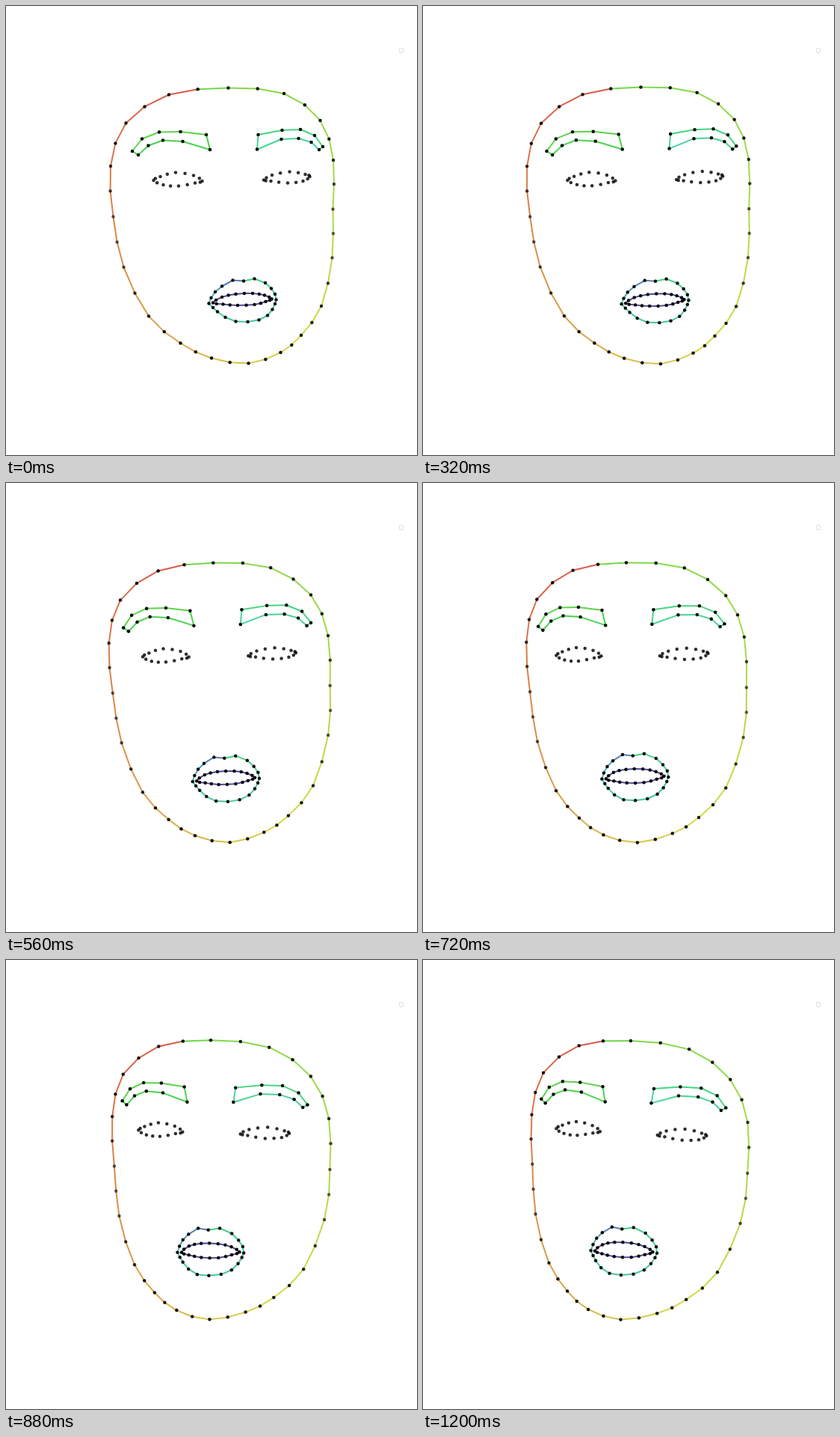
Write an HTML page with a canvas that moves like this. It is 550 px wide and 600 px high and loops after 1.28 s.

```html
<!DOCTYPE html>
<html lang="en">
<head>
<meta charset="utf-8">
<title>Face contours</title>
<style>
html, body { margin: 0; width: 100%; height: 100%; overflow: hidden; background: #fff; }
canvas { display: block; width: 550px; height: 600px; }
</style>
</head>
<body>
<canvas id="stage"></canvas>
<script>
const W = 550, H = 600, STEP = 80, STEPS = 16;
const canvas = document.getElementById('stage');
const ctx = canvas.getContext('2d');
const dpr = window.devicePixelRatio || 1;
canvas.width = W * dpr;
canvas.height = H * dpr;

const hsl = (h, s, l) => `hsl(${h} ${s}% ${l}%)`;

const hermite = (a, b, ta, tb, u) => {
  const v = 1 - u;
  return a * v * v * (1 + 2 * u) + b * u * u * (1 + 2 * v) + ta * u * v * v - tb * u * u * v;
};

// Closed smooth curve through x,y pairs, with n points per span.
function curve(flat, n = 1) {
  const count = flat.length / 2, out = [];
  const at = (i, c) => flat[(i + count) % count * 2 + c];
  for (let i = 0; i < count; i++) {
    for (let j = 0; j < n; j++) {
      out.push([0, 1].map(c => hermite(at(i, c), at(i + 1, c),
        (at(i + 1, c) - at(i - 1, c)) / 2, (at(i + 2, c) - at(i, c)) / 2, j / n)));
    }
  }
  return out;
}

// Shift over the whole turn: bent and sheared in x, sheared in y, around (cx, cy).
const bend = (cx, cy, [a, b, c, q], [d, e, f = 0]) => ([x, y]) => {
  const u = x - cx, v = y - cy;
  return [a + b * u + c * v + q * u * u, d + e * u + f * v];
};

const ovalShift = curve([
  -19.5, -1.5, -12.5, 4.5, -3.5, 11, -6, 14.5, -28, 16.3, -49, 11.8,
  -60, 3, -48, -6.3, -22.5, -9.7, -1, -9.2, 5.5, -7.2, -3.5, -5], 3);

const parts = [
  { // face oval
    pts: curve([
      297.5, 109.5, 372, 117, 420.5, 153, 438, 206, 437.5, 271.5, 436.5, 336.5,
      422, 401, 395, 440, 367.5, 463, 324.5, 477.5, 275, 470.5, 233.5, 450.5,
      191, 414.5, 157.5, 349, 143.5, 281.5, 140, 214, 160.5, 156.5, 218, 118.5], 2),
    shift: (p, i) => ovalShift[i],
    nod: y => Math.max(0, (y - 350) / 260),
    line: i => hsl(i === 35 ? 104 : 97 - 89 * i / 34, 65, 57),
    alpha: y => .95 - .36 * Math.exp(-(((y - 300) / 95) ** 2))
  },
  { // left brow
    pts: curve([169, 194, 182, 177.5, 205, 168.5, 233.5, 168, 268, 172,
      273, 192, 236.5, 181, 210, 179.5, 190.5, 186.5, 177, 199]),
    shift: bend(221, 180, [-22, -.18, -.07, .0011], [-5.3, .055]),
    nod: () => .1,
    line: i => hsl(i < 4 ? 112 : 122, 62, 56),
    alpha: () => 1
  },
  { // right brow
    pts: curve([337.5, 172, 369.5, 166, 394, 165, 413, 173, 424, 188,
      419, 192, 408.5, 182, 391.5, 177, 368.5, 178, 336, 191.5]),
    shift: bend(380, 178, [-25, .13, -.1, .0008], [4.7, .11]),
    nod: () => .1,
    line: i => hsl(i < 5 ? 144 : 154, 63, 56),
    alpha: () => 1
  },
  { // left eye
    pts: curve([197.5, 233, 206.5, 228, 227, 222.5, 251, 226.5,
      262.5, 234, 253, 236.5, 231, 240.5, 210.5, 239], 2),
    shift: bend(230, 232, [-23.4, -.1, -.12, .0012], [-6.3, .045]),
    nod: () => .2,
    alpha: () => .82
  },
  { // right eye
    pts: curve([345, 232.5, 356, 226, 379.5, 221.5, 400.5, 225,
      406.5, 228, 397.5, 234, 377, 236.5, 354.5, 234], 2),
    shift: bend(376, 229, [-29.7, .06, -.08, .0007], [4.2, .09]),
    nod: () => .2,
    alpha: () => .82
  },
  { // outer lips
    pts: curve([271.5, 397.5, 274.5, 390, 280, 382, 289, 374.5, 303.5, 366.5,
      318, 367.5, 332.5, 364.5, 347, 370, 355, 377.5, 360, 385,
      361.5, 392.5, 360, 398, 356.5, 405.5, 350, 413.5, 338.5, 419.5,
      323.5, 422, 307.5, 421.5, 293.5, 416, 283, 408.5, 277, 403]),
    shift: bend(317, 394, [-55, -.02, -.125, .0037], [-5, .1, .12]),
    nod: () => 1,
    line: i => i < 4 ? hsl(176 + i * 11, 45, 52)
      : i === 4 ? hsl(214, 35, 52)
      : i < 10 ? hsl(138 + i * 2, 60, 54)
      : hsl(149 + i, 55, 53),
    alpha: () => .95
  },
  { // inner lips
    pts: curve([277, 396.5, 289, 389, 307.5, 385, 330, 384, 346, 386.5,
      355.5, 391.5, 347.5, 395, 332.5, 399, 310, 400, 290.5, 398.5], 2),
    shift: bend(317, 392, [-53, -.02, -.19, .0038], [-5, .1, .25]),
    nod: () => 1,
    line: i => hsl(i < 10 ? 240 : 252, 35, 45),
    alpha: () => .97
  }
];

// step, share of the turn, roll in radians, nod in pixels
const keys = [
  [0, 0, 0, 0],
  [2, .028, .0044, .4],
  [4, .146, .0145, 2.4],
  [6, .41, .039, 6.5],
  [9, .754, .0497, 4.8],
  [11, .931, .0246, 1.4],
  [15, 1, 0, 0]
];

function slope(i, c) {
  if (i === 0 || i === keys.length - 1) return 0;
  const a = keys[i - 1], b = keys[i + 1];
  return (b[c] - a[c]) / (b[0] - a[0]);
}

function headPose(step) {
  let i = 0;
  while (i < keys.length - 2 && step >= keys[i + 1][0]) i++;
  const a = keys[i], b = keys[i + 1], span = b[0] - a[0], u = (step - a[0]) / span;
  return [1, 2, 3].map(c => hermite(a[c], b[c], slope(i, c) * span, slope(i + 1, c) * span, u));
}

function place(part, [turn, roll, nod]) {
  return part.pts.map((p, i) => {
    const [dx, dy] = part.shift(p, i);
    const x = p[0] + dx * turn, y = p[1] + dy * turn;
    return [x + roll * (y - 325), y - .88 * roll * (x - 240) + nod * part.nod(y)];
  });
}

function drawPart(part, pose) {
  const pts = place(part, pose);
  if (part.line) {
    pts.forEach(([x, y], i) => {
      ctx.strokeStyle = part.line(i);
      ctx.beginPath();
      ctx.moveTo(x, y);
      ctx.lineTo(...pts[(i + 1) % pts.length]);
      ctx.stroke();
    });
  }
  for (const [x, y] of pts) {
    ctx.fillStyle = `rgba(0,0,0,${part.alpha(y)})`;
    ctx.beginPath();
    ctx.arc(x, y, 2.25, 0, Math.PI * 2);
    ctx.fill();
  }
}

function drawLegend() {
  ctx.strokeStyle = '#ddd';
  ctx.lineWidth = 1;
  ctx.beginPath();
  ctx.roundRect(526.5, 56.5, 5, 6, 1);
  ctx.stroke();
}

function draw(step) {
  ctx.setTransform(dpr, 0, 0, dpr, 0, 0);
  ctx.fillStyle = '#fff';
  ctx.fillRect(0, 0, W, H);
  drawLegend();
  ctx.lineWidth = 2;
  ctx.lineCap = 'round';
  const pose = headPose(step);
  parts.forEach(part => drawPart(part, pose));
}

let start = null, shown = 0;
function tick(now) {
  if (start === null) start = now;
  const step = Math.floor((now - start) / STEP) % STEPS;
  if (step !== shown) draw(shown = step);
  requestAnimationFrame(tick);
}
draw(0);
requestAnimationFrame(tick);
</script>
</body>
</html>
```
